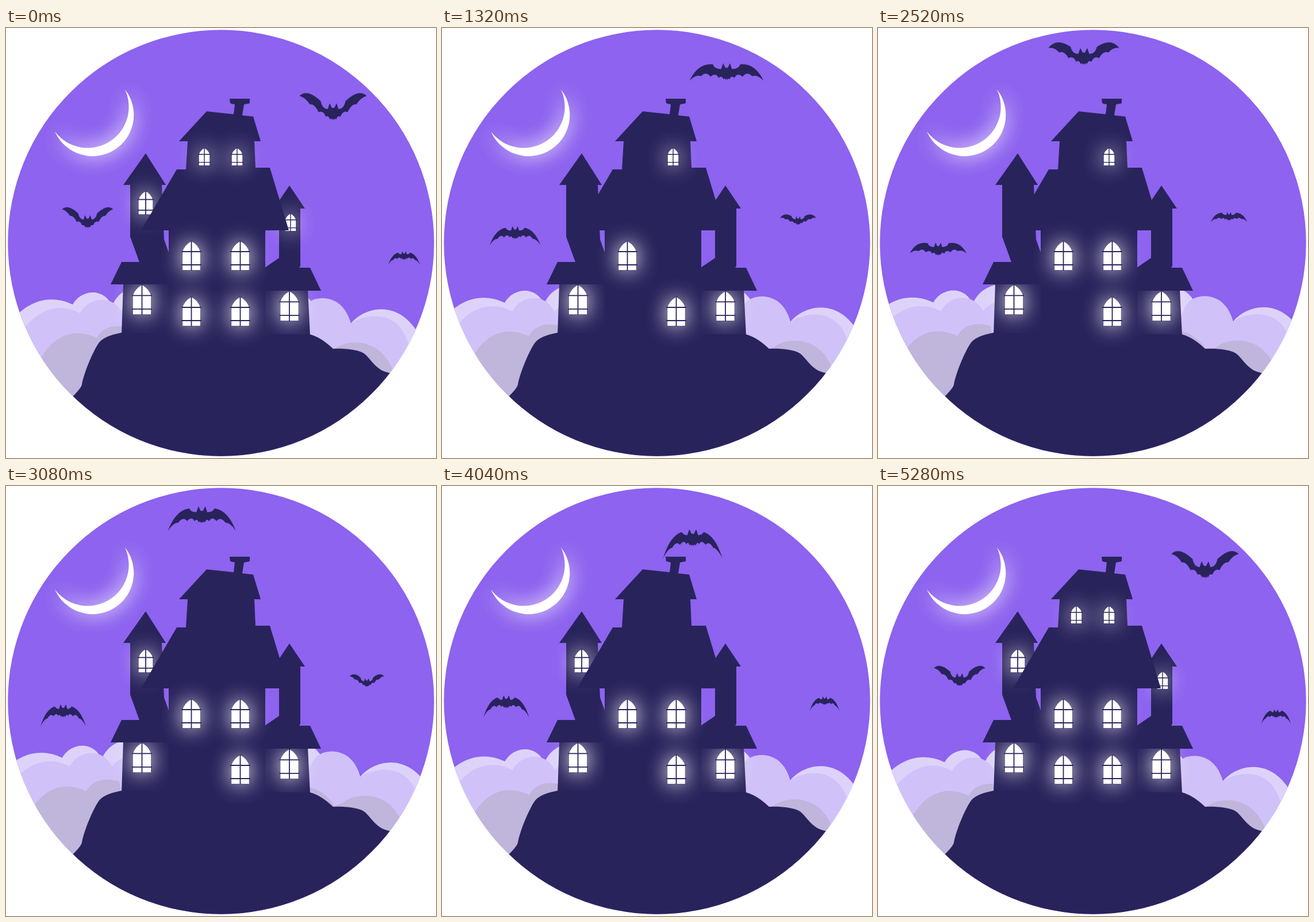
An HTML page with a canvas for the animation above (5320 ms loop, 748 by 748 pixels).

```html
<!DOCTYPE html>
<html lang="en">
<head>
<meta charset="utf-8">
<title>Haunted house</title>
<style>
html, body { margin: 0; width: 100%; height: 100%; overflow: hidden; background: #fff; }
canvas { display: block; width: 748px; height: 748px; }
</style>
</head>
<body>
<canvas id="stage" width="748" height="748"></canvas>
<script>
const ctx = document.getElementById('stage').getContext('2d');
const LOOP = 5320, TAU = Math.PI * 2;
const SKY = '#8d63ef', DARK = '#29235c';
const LIGHT = '#ddd3fa', MID = '#d0c2f8', DUSK = '#c0b5db';

const ease = r => (1 - Math.cos(Math.PI * r)) / 2;

function fill(path, color) {
  ctx.fillStyle = color;
  ctx.fill(path);
}

const layer = (d, color) => ({ path: new Path2D(d), color });

const leftClouds = [
  layer('M-20 565C0 503 52 451 116 481C130 455 170 450 185 484C190 465 215 445 245 450V680H-20Z', LIGHT),
  layer('M0 580C30 500 80 470 129 496C143 468 185 462 203 496Q215 478 250 475V680H0Z', MID),
  layer('M40 620C65 545 105 515 158 539C168 520 190 514 215 522L250 680H20Z', DUSK)
];
const rightClouds = [
  layer('M460 470Q505 440 530 475L600 514C625 482 700 465 732 565V680H460Z', LIGHT),
  layer('M505 520Q515 480 530 475C540 468 585 460 600 514C630 494 685 492 700 550L715 680H505Z', MID),
  layer('M470 560C490 520 530 525 555 565L572 558C585 545 650 530 675 600L700 680H470Z', DUSK)
];

const hill = new Path2D('M95 665L117 640Q131 626 132 620C136 598 152 562 160 550Q168 536 201 530' +
  'L529 533Q548 538 569 558C590 557 610 560 619 564C634 571 640 595 667 600H760V760H0V700Z');
const towers = new Path2D('M243 218L278 273H271L275 368L284 393V410H233L216 363V273H204Z' +
  'M493 274L520 314H512V414L508 420H450V417L475 400V314H466Z');
const wings = new Path2D('M204 444H284V535H201ZM450 455H525L529 535H450Z');
const eaves = new Path2D('M201 407H284V446H182ZM450 417H529L548 457H450Z');
const main = new Path2D('M349 145L396 150L398 133L390 131L389 123H424V131L414 133L411 152L430 154' +
  'L443 197H432L434 243H459L492 352H451V536H283V352H235L297 246H313L316 197H301Z');

// x, top, height, then the spans in which the light is out
const towerWindows = [
  [243, 284, 40, [920, 3080], [4060, 4880]],
  [495, 323, 30, [920, 4060]]
];
const wingWindows = [[236.5, 447, 51], [493, 458, 51]];
const mainWindows = [
  [345, 209, 30, [920, 4060]],
  [402, 209, 30, [3080, 4880]],
  [322.5, 371, 50],
  [407.5, 371, 50, [920, 1920], [4060, 4880]],
  [322.5, 468, 50, [920, 4060]],
  [407.5, 468, 50]
];

function drawWindow([x, y, h, ...dark], t) {
  if (dark.some(([from, to]) => t >= from && t < to)) return;
  const w = h * 0.305, spring = y + h * 0.36;
  ctx.save();
  ctx.shadowColor = '#fff';
  ctx.shadowBlur = 36;
  ctx.beginPath();
  ctx.moveTo(x - w, y + h);
  ctx.lineTo(x - w, spring);
  ctx.quadraticCurveTo(x - w * 0.77, y + h * 0.13, x, y);
  ctx.quadraticCurveTo(x + w * 0.77, y + h * 0.13, x + w, spring);
  ctx.lineTo(x + w, y + h);
  ctx.fillStyle = '#fff';
  ctx.fill();
  ctx.restore();
  ctx.strokeStyle = DARK;
  ctx.lineWidth = h > 35 ? 1.8 : 1.4;
  ctx.beginPath();
  ctx.moveTo(x, y - 1);
  ctx.lineTo(x, y + h + 1);
  for (const f of [0.36, 0.82]) {
    ctx.moveTo(x - w - 2, y + h * f);
    ctx.lineTo(x + w + 2, y + h * f);
  }
  ctx.stroke();
}

// Two offset circles that share the crescent's tips
function drawMoon() {
  const tilt = Math.atan2(122, 73), half = 71.1;
  const a = Math.atan2(half, -9), b = Math.atan2(half, 7.5);
  ctx.save();
  ctx.shadowColor = '#fff';
  ctx.shadowBlur = 34;
  ctx.beginPath();
  ctx.arc(150.6, 151.2, 71.7, tilt - a, tilt + a);
  ctx.arc(142.1, 137.1, 71.5, tilt + b, tilt - b, true);
  ctx.fillStyle = '#fff';
  ctx.fill();
  ctx.restore();
}

// Spread wing: corner, front control, tip, then scallops back to the body
const wing = [[24, -14], [50, -20], [65, 8], [54, -1], [45, 4], [36, -4], [28, 7], [19, 0], [14, 10]];
const body = new Path2D('M0 -7L2 -7L6 -15L9 -6L10 4L7 10L5 13L3 11L2 14L0 12' +
  'L-2 14L-3 11L-5 13L-7 10L-10 4L-9 -6L-6 -15L-2 -7Z');

// Wings bend along a parabola and draw in; u runs from -1 (down) to 1 (up)
const bend = (x, y, u) => [
  x * (1 - (0.16 - 0.05 * u) * u * u),
  y - u * (0.0078 + 0.0013 * u) * x * x
];

function drawBat(x, y, size, u) {
  const p = wing.map(([px, py]) => bend(px, py, u));
  ctx.save();
  ctx.translate(x, y);
  ctx.scale(size, size);
  fill(body, DARK);
  for (const side of [1, -1]) {
    ctx.save();
    ctx.scale(side, 1);
    ctx.beginPath();
    ctx.moveTo(0, -5);
    ctx.lineTo(8, -5);
    ctx.quadraticCurveTo(p[0][0] - 3, -4, ...p[0]);
    for (let i = 1; i < p.length; i += 2) ctx.quadraticCurveTo(...p[i], ...p[i + 1]);
    ctx.quadraticCurveTo(9, 6, 5, 11);
    ctx.lineTo(0, 11);
    ctx.fill();
    ctx.restore();
  }
  ctx.restore();
}

// Each bat flies out until `far`, along a bow, and straight back
const bats = [
  { size: 1, from: [569, 146], to: [340, 50], far: 3000, bow: [20, -32], beats: 15, shift: -0.05 },
  { size: 0.76, from: [142, 337], to: [99, 392], far: 3300, bow: [0, 0], beats: 11, shift: 0 },
  { size: 0.5, from: [692.5, 396], to: [602.5, 321], far: 1850, bow: [0, 0], beats: 18, shift: 0.295 }
];

function flyBat({ size, from, to, far, bow, beats, shift }, t) {
  const out = t < far;
  const e = ease(out ? t / far : (LOOP - t) / (LOOP - far));
  const arc = out ? Math.sin(Math.PI * e) : 0;
  const [x, y] = from.map((a, i) => a + (to[i] - a) * e + bow[i] * arc);
  const swing = Math.cos(TAU * (beats * t / LOOP - shift));
  drawBat(x, y, size, Math.tanh(2.5 * (swing - 0.25)));
}

function drawClouds(layers, dx, dy) {
  ctx.save();
  ctx.translate(dx, dy);
  for (const { path, color } of layers) fill(path, color);
  ctx.restore();
}

function draw(t) {
  ctx.fillStyle = '#fff';
  ctx.fillRect(0, 0, 748, 748);
  ctx.save();
  ctx.beginPath();
  ctx.arc(374, 374, 370.7, 0, TAU);
  ctx.fillStyle = SKY;
  ctx.fill();
  ctx.clip();

  drawMoon();
  const turn = TAU * t / LOOP, away = ease(2 * t / LOOP);
  const drift = 20 * away ** 1.5;
  const bob = 2 * Math.sin(turn) + 2.5 * Math.sin(3 * turn) - 5 * away;
  drawClouds(leftClouds, -drift, bob);
  drawClouds(rightClouds, drift * 0.9, bob);

  const light = w => drawWindow(w, t);
  fill(towers, DARK);
  towerWindows.forEach(light);
  fill(wings, DARK);
  wingWindows.forEach(light);
  for (const part of [eaves, main, hill]) fill(part, DARK);
  mainWindows.forEach(light);

  for (const bat of bats) flyBat(bat, t);
  ctx.restore();
}

const start = performance.now();
function tick() {
  draw((performance.now() - start) % LOOP);
  requestAnimationFrame(tick);
}
tick();
</script>
</body>
</html>
```
